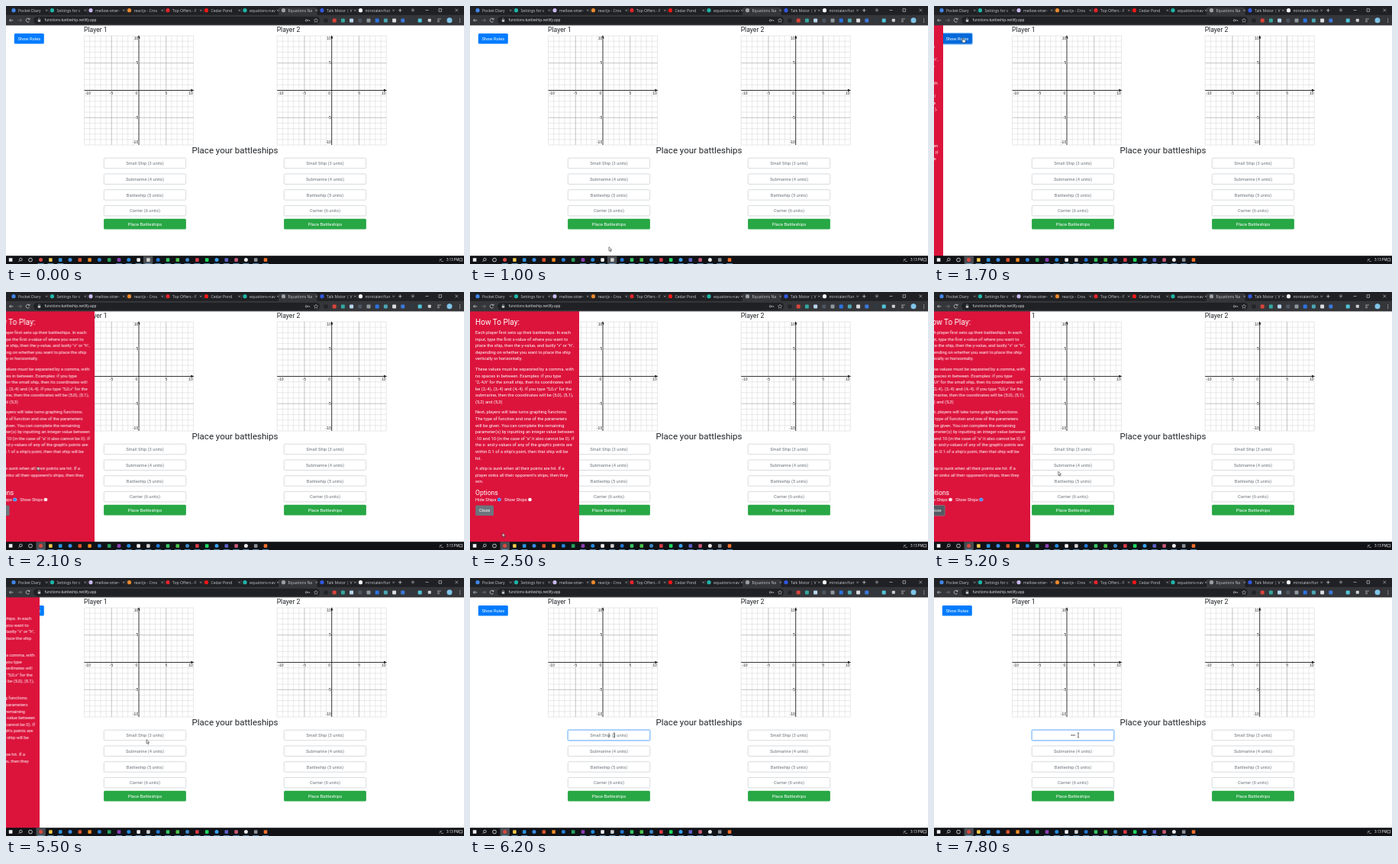
These frames come from a looping animation (600 by 338 pixels, 8000 ms). An HTML page:

```html
<!DOCTYPE html>
<html lang="en">
<head>
<meta charset="utf-8">
<title>Graph game</title>
<style>
html, body { margin: 0; width: 100%; height: 100%; overflow: hidden; background: #fff; }
svg { display: block; width: 600px; height: 338px; }
text { font: 5.75px Roboto, sans-serif; fill: #212529; white-space: pre; }
.mid { text-anchor: middle; }
.h2 { font-size: 11.5px; }
.h3 { font-size: 10.06px; }
.h4 { font-size: 8.62px; }
.hint { fill: #6c757d; }
.white, .side text { fill: #fff; }
.tick { font: 5px "Liberation Sans", Arial, sans-serif; fill: #222; stroke: #fff; stroke-width: 1px; paint-order: stroke; }
.tab { font: 5.1px "Open Sans", sans-serif; fill: #c6c8cc; }
.url { font: 4.7px "Open Sans", sans-serif; fill: #e8eaed; }
.clock { font: 4.4px "Open Sans", sans-serif; fill: #fff; }
.line { fill: none; stroke: #c9ccd0; stroke-width: .7; }

.side, .cursor, .anim { animation: 8s infinite both; }
.anim { animation-timing-function: step-end; }
.side { animation-name: slide; animation-timing-function: ease-in-out; }
.cursor { animation-name: travel; animation-timing-function: ease-in-out; }
@keyframes slide {
  0%, 19.25% { transform: translateX(-143px); }
  29.25%, 62.63% { transform: translateX(0); }
  72.63%, 100% { transform: translateX(-143px); }
}
@keyframes travel {
  0%, 11% { transform: translate(200px, 350px); }
  17.5%, 22% { transform: translate(38px, 41.5px); }
  29%, 35% { transform: translate(42.5px, 315.5px); }
  44%, 48% { transform: translate(80.7px, 281px); }
  50.5%, 54% { transform: translate(79px, 272px); }
  59%, 62% { transform: translate(20px, 286px); animation-timing-function: ease-out; }
  65% { transform: translate(162.6px, 235px); animation-timing-function: ease-out; }
  71%, 100% { transform: translate(189px, 206px); }
}
.arrow { animation-name: arrow; }
.hand { animation-name: hand; }
.beam { animation-name: beam; }
.press { animation-name: press; }
.front { animation-name: front; }
.back { animation-name: back; }
.hide-on { animation-name: hideOn; }
.show-on { animation-name: showOn; }
.closing { animation-name: closing; }
.focus { animation-name: focus; }
.empty { animation-name: empty; }
.dot1 { animation-name: dot1; }
.dot2 { animation-name: dot2; }
.dot3 { animation-name: dot3; }
.caret0 { animation-name: caret0; }
.caret1 { animation-name: caret1; }
@keyframes arrow { 0% { opacity: 1 } 16.5% { opacity: 0 } 23% { opacity: 1 } 58% { opacity: 0 } 62.8% { opacity: 1 } 69% { opacity: 0 } }
@keyframes hand { 0% { opacity: 0 } 16.5% { opacity: 1 } 23% { opacity: 0 } 58% { opacity: 1 } 62.8%, 100% { opacity: 0 } }
@keyframes beam { 0% { opacity: 0 } 69%, 100% { opacity: 1 } }
@keyframes press { 0% { opacity: 0 } 16.5% { opacity: 1 } 50%, 100% { opacity: 0 } }
@keyframes front { 0% { opacity: 0 } 18.75%, 100% { opacity: 1 } }
@keyframes back { 0% { opacity: 1 } 18.75%, 100% { opacity: 0 } }
@keyframes hideOn { 0% { opacity: 1 } 52.5%, 100% { opacity: 0 } }
@keyframes showOn { 0% { opacity: 0 } 52.5%, 100% { opacity: 1 } }
@keyframes closing { 0% { opacity: 0 } 58.7%, 100% { opacity: 1 } }
@keyframes focus { 0% { opacity: 0 } 76%, 100% { opacity: 1 } }
@keyframes empty { 0% { opacity: 1 } 81.25%, 100% { opacity: 0 } }
@keyframes dot1 { 0% { opacity: 0 } 81.25% { opacity: 1; transform: translateX(2px) } 83.75% { opacity: 1; transform: translateX(1px) } 87.5%, 100% { opacity: 1; transform: none } }
@keyframes dot2 { 0% { opacity: 0 } 83.75% { opacity: 1; transform: translateX(1px) } 87.5%, 100% { opacity: 1; transform: none } }
@keyframes dot3 { 0% { opacity: 0 } 87.5%, 100% { opacity: 1 } }
@keyframes caret0 { 0% { opacity: 0 } 76.25% { opacity: 1 } 81.25%, 100% { opacity: 0 } }
@keyframes caret1 { 0% { opacity: 0 } 81.25% { opacity: 1; transform: translateX(-2px) } 83.75% { opacity: 1; transform: translateX(-1px) } 87.5% { opacity: 1; transform: none } 93.75%, 100% { opacity: 0 } }
</style>
</head>
<body>
<svg id="stage" viewBox="0 0 600 338"></svg>
<script>
const text = (x, y, s, cls = '') => `<text x="${x}" y="${y}" class="${cls}">${s}</text>`;
const rect = (x, y, w, h, fill, r = 0, extra = '') =>
  `<rect x="${x}" y="${y}" width="${w}" height="${h}" rx="${r}" fill="${fill}" ${extra}/>`;
const disc = (x, y, r, fill, extra = '') => `<circle cx="${x}" cy="${y}" r="${r}" fill="${fill}" ${extra}/>`;
const path = (d, color, w = .7, extra = '') =>
  `<path d="${d}" fill="none" stroke="${color}" stroke-width="${w}" ${extra}/>`;
const group = (cls, ...parts) => `<g class="${cls}">${parts.join('')}</g>`;

function plot(ox) {
  const oy = 110.5, unit = 7.15, half = unit * 10;
  let minor = '', major = '';
  for (let i = -10; i <= 10; i++) {
    const d = i * unit;
    const seg = `M${ox + d} ${oy - half}v${2 * half}M${ox - half} ${oy + d}h${2 * half}`;
    if (i % 5 || Math.abs(i) === 10) minor += seg; else if (i) major += seg;
  }
  const xs = [[-66.7, '-10'], [-36, '-5'], [-3, '0'], [36, '5'], [68, '10']];
  const ys = [[44, '10'], [76.3, '5'], [148, '-5'], [180.2, '-10']];
  return path(minor, '#d6d6d6', .55) + path(major, '#9a9a9a', .6) +
    path(`M${ox - half} ${oy}h${2 * half}M${ox} ${oy - half}v${2 * half}`, '#111', .85) +
    `<path d="M${ox + half + .8} ${oy}l-4-1.7v3.4zM${ox} ${oy - half - .5}l-1.7 4h3.4z" fill="#111"/>` +
    xs.map(([d, s]) => text(ox + d, 116.2, s, 'tick mid')).join('') +
    ys.map(([y, s]) => `<text x="${ox - .8}" y="${y}" class="tick" text-anchor="end">${s}</text>`).join('');
}

const ships = ['Small Ship (3 units)', 'Submarine (4 units)', 'Battleship (5 units)', 'Carrier (6 units)'];
function form(cx, live) {
  const x = cx - 53.7;
  const fields = ships.map((s, i) => {
    const y = 199.2 + i * 20.75;
    const cls = 'mid hint' + (live && !i ? ' anim empty' : '');
    return rect(x, y, 107.4, 13.5, '#fff', 1.5, 'class="line" style="fill:#fff"') + text(cx, y + 8.8, s, cls);
  });
  return fields.join('') + rect(x - .2, 278.8, 107.8, 13.7, '#28a745', 1.5) +
    text(cx, 287.6, 'Place Battleships', 'mid white');
}

const ring = group('anim focus',
  rect(127.7, 198.6, 108.6, 14.7, 'none', 2, 'stroke="#bfdeff" stroke-width="1.15"'),
  rect(128.3, 199.2, 107.4, 13.5, 'none', 1.5, 'stroke="#80bdff" stroke-width=".8"'));
const entry = [0, 1, 2].map(i => disc(180.1 + i * 2, 206, .8, '#343a40', `class="anim dot${i + 1}"`)).join('') +
  rect(181.8, 202.8, .5, 6.3, '#222', 0, 'class="anim caret0"') +
  rect(185.2, 202.8, .5, 6.3, '#222', 0, 'class="anim caret1"');

const rulesButton = rect(10.8, 36, 39, 13.6, '#007bff', 1.5) +
  group('anim press',
    rect(10.2, 35.4, 40.2, 14.8, 'none', 2, 'stroke="#93c7ff" stroke-width="1.15"'),
    rect(10.8, 36, 39, 13.6, '#0069d9', 1.5)) +
  text(30.3, 44.8, 'Show Rules', 'mid white');

const rules = [
  [55, ['Each player first sets up their battleships. In each', 'input, type the first x-value of where you want to',
    'place the ship, then the y-value, and lastly "v" or "h",', 'depending on whether you want to place the ship', 'vertically or horizontally.']],
  [103, ['These values must be separated by a comma, with', 'no spaces in between. Examples: if you type',
    '"2,-4,h" for the small ship, then its coordinates will', 'be (2,-4), (3,-4) and (4,-4). If you type "5,0,v" for the',
    'submarine, then the coordinates will be (5,0), (5,1),', '(5,2) and (5,3)']],
  [159.3, ['Next, players will take turns graphing functions.', 'The type of function and one of the parameters',
    'will be given. You can complete the remaining', 'parameter(s) by inputting an integer value between',
    '-10 and 10 (in the case of "a" it also cannot be 0). If', 'the x- and y-values of any of the graph\'s points are',
    'within 0.1 of a ship\'s point, then that ship will be', 'hit.']],
  [233, ['A ship is sunk when all their points are hit. If a', 'player sinks all their opponent\'s ships, then they', 'win.']]
];
const radio = (x, cls) => disc(x, 272, 2.3, '#fff') +
  group('anim ' + cls, disc(x, 272, 1.9, '#fff', 'stroke="#0075ff" stroke-width=".8"'), disc(x, 272, 1.25, '#0075ff'));
const sidebar = group('side',
  rect(-4, 25, 147, 303, '#dc143c'),
  text(7, 43.3, 'How To Play:', 'h3'),
  ...rules.flatMap(([y, lines]) => lines.map((s, i) => text(7, y + i * 8.6, s))),
  text(7, 266, 'Options', 'h4'),
  text(7, 274.1, 'Hide Ships'), radio(38.3, 'hide-on'),
  text(45, 274.1, 'Show Ships'), radio(78.5, 'show-on'),
  rect(7.2, 279.5, 23.8, 13.6, '#6c757d', 1.5),
  group('anim closing', rect(7.2, 279.5, 23.8, 13.6, '#545b62', 1.5, 'stroke="#99707f" stroke-width=".8"')),
  text(19.1, 288.3, 'Close', 'mid'));

const tabs = [
  ['Pocket Diary', '#3f86e8'], ['Settings for c', '#1fb5a8'], ['mellow-otter-', '#c9b8f0'], ['reactjs - Cros', '#e8892e'],
  ['Top Offers - F', '#e0242c'], ['Cedar Pond', '#f01818'], ['equations-nav', '#1fb5a8'], ['Equations Na', '#9aa0a6'],
  ['Talk Motor | V', '#3158e0'], ['mirotalen/fun', '#fff']
];
const tools = ['#202328', '#d8443a', '#35a7a0', '#b8d5ee', '#4d5560', '#8f979e', '#2b74e4', '#4aa6b4',
  '#d9dde0', '#3b78d8', '#2f3a44', '#52c3d9'];
function browser() {
  let s = rect(0, 0, 600, 13, '#202124') + rect(0, 11.8, 600, 13.6, '#35363a') +
    rect(357, 1.8, 50.5, 12, '#35363a', 2);
  tabs.forEach(([name, color], i) => {
    const x = 10 + i * 50.5;
    s += disc(x, 5.7, 2.6, color) + text(x + 6, 7.6, name, 'tab') +
      path(`M${x + 42} 4.5l2.4 2.4m0-2.4l-2.4 2.4`, '#b5b7bb', .6);
    if (i < 9 && i !== 6 && i !== 7) s += rect(x + 46, 3, .4, 6, '#55575b');
  });
  s += path('M514 5.7h4.6m-2.3-2.3v4.6', '#d5d7da') + disc(533, 5.5, 2.4, '#4a4c50') +
    path('M532 5l1 1 1-1', '#e5e5e5', .5) +
    path('M549.5 5.5h4M567 3.7h3.6v3.6h-3.6zM588.5 3.7l3.6 3.6m0-3.6l-3.6 3.6', '#dcdcdc', .6);
  s += path('M9.5 18.8h-5m2-2l-2 2 2 2', '#d5d7da') + path('M15.5 18.8h5m-2-2l2 2-2 2', '#7d8084') +
    path('M30.6 17.3a2.4 2.4 0 1 0 .1 2.6M31 15.8v1.8h-1.8', '#d5d7da');
  s += rect(36, 13.9, 375, 9.8, '#202124', 4.9) + rect(41.8, 18, 3.4, 2.8, '#bdc1c6', .4) +
    path('M42.5 18v-1a1 1 0 0 1 2 0v1', '#bdc1c6', .5) + text(50.6, 20.4, 'functions-battleship.netlify.app', 'url');
  s += disc(393.5, 18.8, 1.2, 'none', 'stroke="#c6c8cc" stroke-width=".7"') + path('M394.7 18.8h3v1.2', '#c6c8cc') +
    path('M406 16.2l.8 1.8 1.9.2-1.4 1.3.4 1.9-1.7-1-1.7 1 .4-1.9-1.4-1.3 1.9-.2z', '#c6c8cc', .5);
  tools.forEach((c, i) => { s += rect(416.5 + i * 11.2, 16.5, 5, 5, c, 1); });
  s += rect(552.8, 16.8, 4, 4, '#d0d2d5', .8) + path('M565 17h5m-5 1.8h3m-3 1.8h3', '#d0d2d5', .6) +
    disc(581, 18.8, 3.5, '#7fc4e8');
  return s + [16.7, 18.8, 20.9].map(y => disc(594.7, y, .55, '#dcdcdc')).join('');
}

const apps = ['#d9493f', '#f2c84b', '#2f92dc', '#3a8be0', '#d7532c', '#f08a24', '#2a7fd4', '#27a05c', '#8b3fb0', '#2489d8',
  '#f0f0f0', '#d0d0d0', '#2276cc', '#35c463', '#4cc24c', '#3b87c8', '#d83a48', '#1ed760', '#3aa0f0', '#5b62c8',
  '#c85a78', '#e8e8e8', '#8a8f94', '#f0702c'];
function taskbar() {
  let s = rect(0, 327.2, 600, 11, '#101216') +
    rect(39.5, 327.2, 12.4, 11, '#4a4d52', 0, 'class="anim front"') +
    rect(180, 327.2, 12.4, 11, '#4a4d52', 0, 'class="anim back"');
  s += rect(3.8, 330.2, 4.6, 4.6, '#f0f0f0') +
    disc(19.4, 332, 1.8, 'none', 'stroke="#eee" stroke-width=".7"') + path('M18.1 333.4l-1.7 1.7', '#eee') +
    disc(32, 332.6, 2.4, 'none', 'stroke="#eee" stroke-width=".8"');
  apps.forEach((c, i) => {
    const x = 45.6 + i * 12.8;
    s += i % 3 ? rect(x - 2.3, 330.3, 4.6, 4.6, c, .8) : disc(x, 332.6, 2.5, c);
    if (i < 3 || i > 7) s += rect(x - 4, 337.2, 8, .7, '#76b9ed');
  });
  return s + path('M567.5 334.5l3.8-3.8M567.8 332h2.2m-.2 2.4h3', '#ddd', .6) +
    text(577, 334.2, '3:13 PM', 'clock') + rect(594, 330.8, 3.8, 3.2, 'none', 0, 'stroke="#ddd" stroke-width=".6"');
}

const cursor = group('cursor',
  `<path class="anim arrow" d="M0 0v5.3l1.2-1.1.9 2 .9-.4-.9-1.9h1.7z" fill="#fff" stroke="#000" stroke-width=".5"/>`,
  `<path class="anim hand" d="M-.6.6q.6-1 1.2 0v2l2.4.6q.7.3.6 1l-.6 2.3h-3.3l-2-2.7q.2-.9 1.7.2z" fill="#fff" stroke="#000" stroke-width=".5"/>`,
  path('M-1.1-3h.8l.3.3.3-.3h.8M0-2.7v5.4M-1.1 3h.8l.3-.3.3.3h.8', '#111', .6, 'class="anim beam"'));

document.getElementById('stage').innerHTML = [
  rect(0, 0, 600, 338, '#fff'),
  text(102, 33.6, 'Player 1', 'h4'), text(354.7, 33.6, 'Player 2', 'h4'),
  plot(174), plot(426.7),
  text(300, 192.6, 'Place your battleships', 'mid h2'),
  form(182, true), form(418, false), ring, entry,
  rulesButton, sidebar, browser(), taskbar(), cursor
].join('');
</script>
</body>
</html>
```
